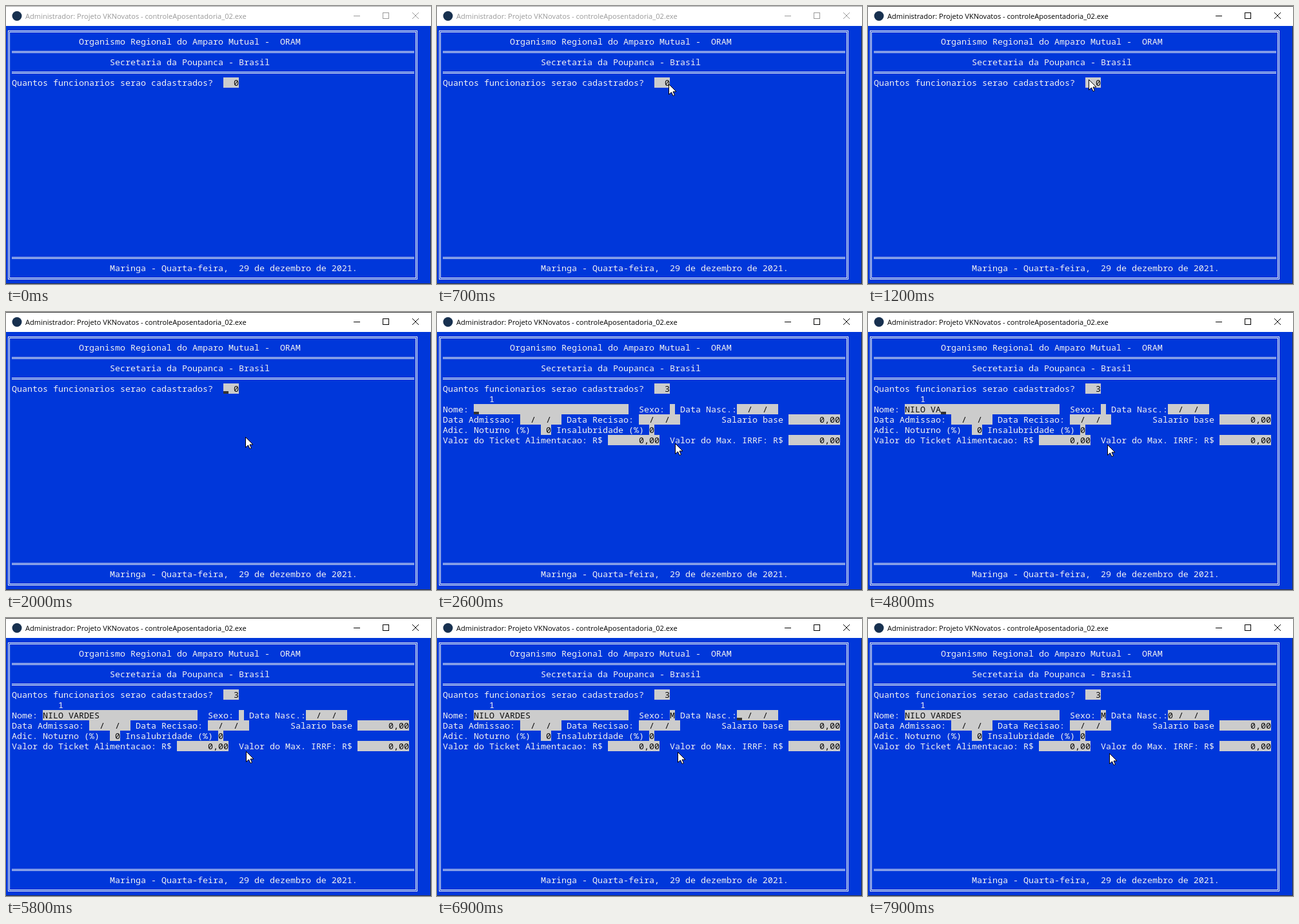
An HTML page with a canvas for the animation above (8000 ms loop, 659 by 432 pixels).

```html
<!DOCTYPE html>
<html lang="pt">
<head>
<meta charset="utf-8">
<title>Controle de aposentadoria</title>
<style>
  html, body { margin: 0; width: 100%; height: 100%; overflow: hidden; background: #0037da; }
  canvas { display: block; }
</style>
</head>
<body>
<canvas id="stage" width="659" height="432"></canvas>
<script>
const LOOP = 8000, TICK = 100;
const BLUE = '#0037da', GREY = '#cccccc', WHITE = '#f2f2f2', INK = '#0c0c0c', EDGE = '#3c3c3c';
const CELL_W = 8, CELL_H = 16;

// Moments of the session, in ms.
const FOCUS = 1200, COUNT_KEY = 2200, COUNT_ENTER = 2400, FORM = 2500;
const NAME_START = 3900, KEY_GAP = 150, NAME_ENTER = 5900, SEX_KEY = 6800, DATE_KEY = 7600;
const BLINK = 520, KEY_HOLD = 200;

const NAME = 'NILO VARDES';
const DATE = '  /  /  ';
const MONEY = `[${'0,00'.padStart(10)}]`;

// Mouse way points: time, x, y.
const PATH = [
  [300, 135, 44], [500, 372, 126], [600, 372, 126], [800, 346, 116], [1000, 342, 114],
  [1500, 342, 114], [1800, 371, 178], [2000, 371, 194], [2600, 369, 204], [7900, 374, 210]
];

const ctx = document.getElementById('stage').getContext('2d');
const cellX = col => 1 + col * CELL_W;
const cellY = row => 31 + row * CELL_H;

function rect(color, x, y, w, h) {
  ctx.fillStyle = color;
  ctx.fillRect(x, y, w, h);
}

function outline(color, x, y, w, h) {
  ctx.strokeStyle = color;
  ctx.lineWidth = 1;
  ctx.strokeRect(x + .5, y + .5, w - 1, h - 1);
}

// Writes a console line; parts in square brackets become grey input fields.
function write(col, row, line) {
  ctx.font = '13.3333px "Noto Sans Mono", monospace';
  line.split(/[\[\]]/).forEach((text, i) => {
    const isField = i % 2 === 1;
    if (isField) rect(GREY, cellX(col), cellY(row), text.length * CELL_W, CELL_H);
    ctx.fillStyle = isField ? INK : WHITE;
    ctx.fillText(text, cellX(col), cellY(row) + 13);
    col += text.length;
  });
}

function titleBar(active) {
  const color = active ? '#000000' : '#999999';
  rect('#ffffff', 0, 0, 659, 31);
  rect(active ? EDGE : '#a8a8a8', 0, 0, 659, 1);
  ctx.fillStyle = '#17304f';
  ctx.beginPath();
  ctx.arc(17, 15.5, 7.5, 0, Math.PI * 2);
  ctx.fill();
  ctx.font = '11.1px "Open Sans", sans-serif';
  ctx.fillStyle = color;
  ctx.fillText('Administrador: Projeto VKNovatos - controleAposentadoria_02.exe', 30, 20);
  outline(color, 584, 10, 10, 10);
  ctx.beginPath();
  ctx.moveTo(539, 15.5); ctx.lineTo(549, 15.5);
  ctx.moveTo(630, 10); ctx.lineTo(640, 20);
  ctx.moveTo(640, 10); ctx.lineTo(630, 20);
  ctx.stroke();
}

function screen() {
  rect(BLUE, 0, 31, 659, 401);
  rect(EDGE, 0, 431, 659, 1);
  rect(EDGE, 658, 31, 1, 401);
  outline(WHITE, 3, 38, 635, 387);
  outline(WHITE, 5, 40, 631, 383);
  for (const row of [2, 4, 22]) {
    for (const dy of [7, 9]) rect(WHITE, 9, cellY(row) + dy, 624, 1);
  }
  write(14, 1, 'Organismo Regional do Amparo Mutual -  ORAM');
  write(20, 3, 'Secretaria da Poupanca - Brasil');
  write(20, 23, 'Maringa - Quarta-feira,  29 de dezembro de 2021.');
}

function typedCount(t) {
  const n = Math.floor((t - NAME_START) / KEY_GAP) + 1;
  return Math.max(0, Math.min(NAME.length, n));
}

function form(t) {
  const name = NAME.slice(0, typedCount(t)).padEnd(30);
  const sex = t < SEX_KEY ? ' ' : 'M';
  const born = t < DATE_KEY ? DATE : '0' + DATE.slice(1);
  [
    '         1',
    `Nome: [${name}]  Sexo: [${sex}] Data Nasc.:[${born}]`,
    `Data Admissao: [${DATE}] Data Recisao: [${DATE}]        Salario base ${MONEY}`,
    'Adic. Noturno (%)  [ 0] Insalubridade (%) [0]',
    `Valor do Ticket Alimentacao: R$ ${MONEY}  Valor do Max. IRRF: R$ ${MONEY}`
  ].forEach((line, i) => write(1, 6 + i, line));
}

function caretCol(t) {
  if (t < FORM) return t < COUNT_KEY ? 42 : 43;
  if (t < NAME_ENTER) return 7 + typedCount(t);
  if (t < SEX_KEY) return 45;
  return t < DATE_KEY ? 58 : 59;
}

// The caret blinks, but stays lit just after a key.
function caretLit(t) {
  const typing = t >= NAME_START && t < NAME_START + NAME.length * KEY_GAP;
  const justHit = [COUNT_KEY, NAME_ENTER, SEX_KEY, DATE_KEY].some(k => t >= k && t < k + KEY_HOLD);
  const origin = t < FORM ? FOCUS : FORM - 900;
  return typing || justHit || (t - origin) % (2 * BLINK) >= BLINK;
}

function caret(t) {
  if (t < FOCUS || !caretLit(t)) return;
  rect('#333333', cellX(caretCol(t)), cellY(t < FORM ? 5 : 7) + 12, CELL_W, 4);
}

function mouse(t) {
  if (t < PATH[0][0]) return;
  const i = Math.max(1, PATH.findIndex(point => point[0] >= t));
  const [t0, x0, y0] = PATH[i - 1], [t1, x1, y1] = PATH[i];
  const p = (t - t0) / (t1 - t0);
  const mix = (a, b) => Math.floor(a + (b - a) * p);
  const arrow = new Path2D('M0 0V16L4 12.5L6.5 18L9 17L6.5 11.5H11.5Z');
  ctx.save();
  ctx.translate(mix(x0, x1) + .5, mix(y0, y1) + .5);
  ctx.fillStyle = '#ffffff';
  ctx.strokeStyle = '#000000';
  ctx.fill(arrow);
  ctx.stroke(arrow);
  ctx.restore();
}

function draw(t) {
  titleBar(t >= FOCUS);
  screen();
  const count = t < COUNT_KEY ? '  0' : t < COUNT_ENTER ? '3  ' : '  3';
  write(1, 5, `Quantos funcionarios serao cadastrados?  [${count}]`);
  if (t >= FORM) form(t);
  caret(t);
  mouse(t);
}

function tick() {
  const t = performance.now() % LOOP;
  draw(t - t % TICK);
  requestAnimationFrame(tick);
}
tick();
</script>
</body>
</html>
```
